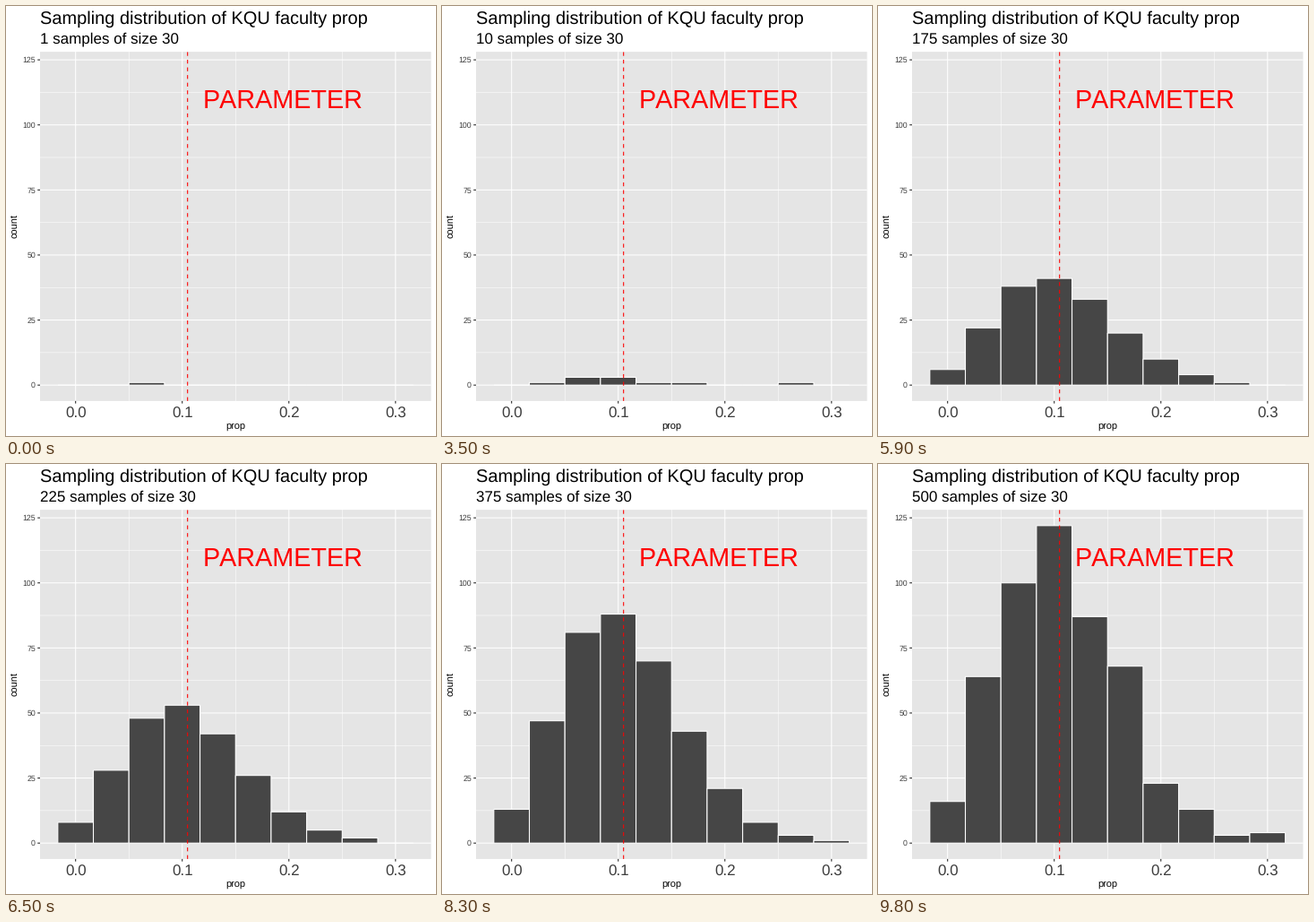
A matplotlib script for the animation above (10000 ms loop, 480x480 px).

```python
from math import comb

import numpy as np
import matplotlib.pyplot as plt
from matplotlib.animation import FuncAnimation
from matplotlib.patches import Rectangle

SIZE, DPI = 480, 72          # at 72 dpi one point is one pixel
LEFT, RIGHT, TOP, BOTTOM = 38, 474.5, 51.1, 440.9
SAMPLE_SIZE, BINS, PARAMETER = 30, 10, 0.105
BIN_WIDTH = 1 / SAMPLE_SIZE
LINE = 1.07
GREY = "#3d3d3d"

plt.rcParams.update({
    "font.family": "Liberation Sans",
    "text.hinting": "none",
    "text.kerning_factor": 6,
    "path.snap": False,
    "lines.dash_capstyle": "butt",
    "lines.solid_capstyle": "butt",
})

FIRST_DRAWS = [2, 2, 4, 2, 3, 1, 8, 5, 3, 3]
FINAL_COUNTS = np.array([16, 64, 100, 122, 87, 68, 23, 13, 3, 4])
TOTALS = [*range(1, 11), 15, *range(25, 501, 25)]
# Frames at which the bars move on; the subtitle follows one frame later.
STEPS = [*range(2, 34, 4), *range(34, 100, 3)]

BINOMIAL = np.array([
    comb(SAMPLE_SIZE, k) * PARAMETER**k * (1 - PARAMETER)**(SAMPLE_SIZE - k)
    for k in range(BINS)
])


def histogram(total):
    """First draws one by one, then binomial growth that settles on the final counts."""
    drawn = np.bincount(FIRST_DRAWS[:total], minlength=BINS)
    if total <= len(FIRST_DRAWS):
        return drawn
    settle = max(0, (total - 375) / 125)
    share = BINOMIAL * (1 - settle) + FINAL_COUNTS / 500 * settle
    return np.maximum(drawn * (total < 500), np.rint(total * share))


def px(prop):
    return LEFT + (prop + BIN_WIDTH) * (RIGHT - LEFT) / (11 * BIN_WIDTH)


def py(count):
    """The count axis runs from 0 to the tallest bar, padded by 5 % each way."""
    tallest = FINAL_COUNTS.max()
    return BOTTOM - (count / tallest + 0.05) * (BOTTOM - TOP) / 1.1


fig = plt.figure(figsize=(SIZE / DPI, SIZE / DPI), dpi=DPI, facecolor="white")
ax = fig.add_axes([0, 0, 1, 1])
ax.set(xlim=(0, SIZE), ylim=(SIZE, 0))
ax.axis("off")


def line(x, y, color, width=LINE, **style):
    ax.plot(x, y, color=color, lw=width, **style)


def label(x, y, text, size, color="black", **style):
    return ax.text(x, y, text, size=size, color=color,
                   **{"va": "baseline", **style})


ax.add_patch(Rectangle((LEFT, TOP), RIGHT - LEFT, BOTTOM - TOP, fc="#e5e5e5", lw=0))

for prop in (0.05, 0.15, 0.25):
    line([px(prop)] * 2, [TOP, BOTTOM], "white", LINE / 2, zorder=1.5)
for count in np.arange(12.5, 125, 25):
    line([LEFT, RIGHT], [py(count)] * 2, "white", LINE / 2, zorder=1.5)

for prop in (0, 0.1, 0.2, 0.3):
    x = px(prop)
    line([x, x], [TOP, BOTTOM], "white", zorder=1.6)
    line([x, x], [BOTTOM, BOTTOM + 2.75], "#262626")
    label(x, 460, f"{prop:.1f}", 17, GREY, ha="center")
for count in range(0, 126, 25):
    y = py(count)
    line([LEFT, RIGHT], [y, y], "white", zorder=1.6)
    line([LEFT - 2.75, LEFT], [y, y], "#262626")
    label(33, y + 3.2, str(count), 8.8, GREY, ha="right")

bars = [
    ax.add_patch(Rectangle((px((i - 0.5) * BIN_WIDTH), py(0)),
                           px(BIN_WIDTH) - px(0), 0,
                           fc="#464646", ec="white", lw=LINE, zorder=3))
    for i in range(BINS)
]
line([px(PARAMETER)] * 2, [BOTTOM, TOP], "red", zorder=4, dashes=(4, 4))
label(220, 114, "PARAMETER", 28.7, "red", zorder=5)

label(LEFT, 20, "Sampling distribution of KQU faculty prop", 20)
subtitle = label(LEFT, 41, "", 17)
label((LEFT + RIGHT) / 2, 473, "prop", 11, ha="center")
label(15, (TOP + BOTTOM) / 2, "count", 11, rotation=90, ha="right", va="center")


def total_at(frame):
    return TOTALS[np.searchsorted(STEPS, frame, side="right")]


def draw(frame):
    for bar, count in zip(bars, histogram(total_at(frame))):
        bar.set_height(py(count) - py(0))
    subtitle.set_text(f"{total_at(frame - 1)} samples of size {SAMPLE_SIZE}")
    return [*bars, subtitle]


anim = FuncAnimation(fig, draw, frames=100, interval=100, repeat=True, repeat_delay=0)
plt.show()
```
